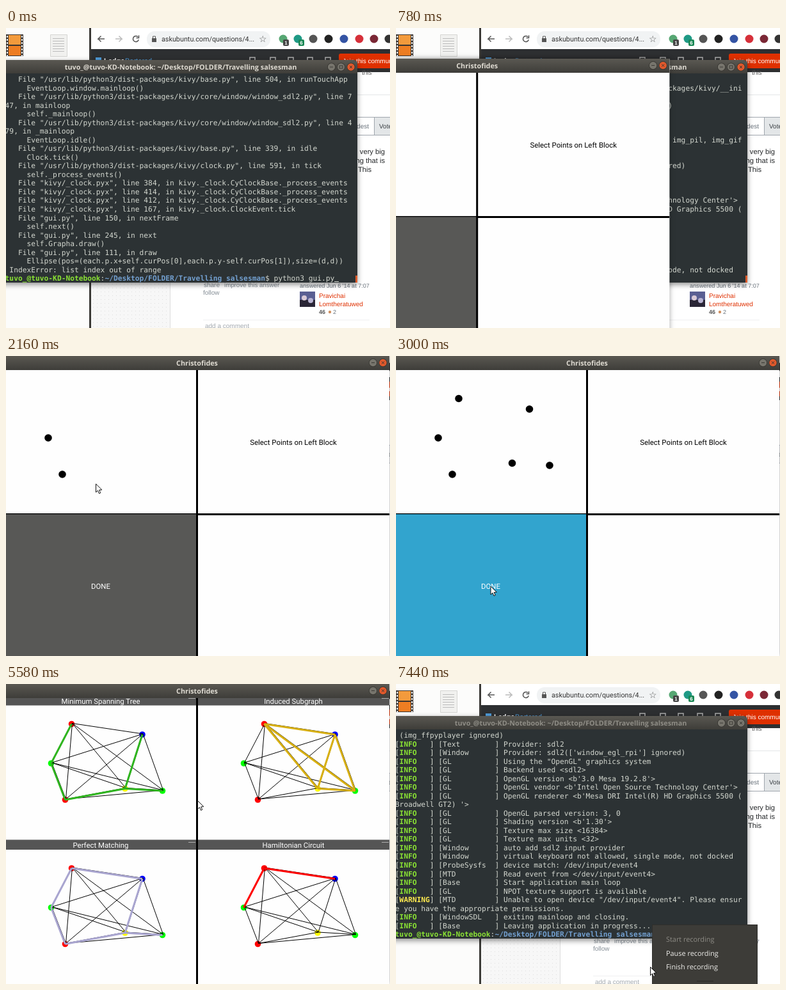
Recreate the animation shown at these times as an HTML page with a canvas. Size 600x469 px, loop 7500 ms.

```html
<!DOCTYPE html>
<html lang="en">
<head>
<meta charset="utf-8">
<title>Christofides</title>
<style>
html, body { margin: 0; width: 100%; height: 100%; overflow: hidden; background: #fff; }
canvas { display: block; width: 600px; height: 469px; }
</style>
</head>
<body>
<canvas id="stage" width="600" height="469"></canvas>
<script>
const ctx = document.getElementById('stage').getContext('2d');
const LOOP = 7500, STEP = 60;
const MONO = '11.25px "DejaVu Sans Mono", monospace';
const UI = '"Open Sans", sans-serif', KIVY = '11.4px Roboto, sans-serif', ARIAL = '"Liberation Sans", sans-serif';
ctx.textRendering = 'geometricPrecision';

// --- drawing helpers
function rect(x, y, w, h, color) {
  ctx.fillStyle = color;
  ctx.fillRect(x, y, w, h);
}
function round(x, y, w, h, r, color) {
  ctx.fillStyle = color;
  ctx.beginPath();
  ctx.roundRect(x, y, w, h, r);
  ctx.fill();
}
function dot(x, y, r, color) {
  ctx.fillStyle = color;
  ctx.beginPath();
  ctx.arc(x, y, r, 0, 7);
  ctx.fill();
}
function line(points, color, width = 1) {
  ctx.strokeStyle = color;
  ctx.lineWidth = width;
  ctx.beginPath();
  points.forEach(p => ctx.lineTo(p[0], p[1]));
  ctx.stroke();
}
function text(s, x, y, font, color, align = 'left') {
  ctx.font = font;
  ctx.fillStyle = color;
  ctx.textAlign = align;
  ctx.fillText(s, x, y);
}
// Linear interpolation through keys [time, x, y]
function track(keys, t) {
  const k = keys.findIndex(key => key[0] > t);
  if (k < 0) return keys.at(-1).slice(1);
  if (k === 0) return keys[0].slice(1);
  const [t0, x0, y0] = keys[k - 1], [t1, x1, y1] = keys[k], u = (t - t0) / (t1 - t0);
  return [x0 + (x1 - x0) * u, y0 + (y1 - y0) * u];
}
const countUntil = (times, t) => times.filter(time => time <= t).length;

// --- terminal contents
const HOST = 'tuvo_@tuvo-KD-Notebook', DIR = '~/Desktop/FOLDER/Travelling salsesman';
const LIB = '/usr/lib/python3/dist-packages/kivy/';
const wrap = s => s.match(/.{1,80}/g);
const call = (file, row, fn, code) =>
  [...wrap(`   File "${file}", line ${row}, in ${fn}`), ...(code ? ['     ' + code] : [])];
const log = (tag, msg, level = 'INFO') => wrap(`[${level.padEnd(7)}] [${tag.padEnd(12)}] ${msg}`);
const prompt = HOST + ':' + DIR + '$ ';

const trace = [
  call(LIB + 'base.py', 504, 'runTouchApp', 'EventLoop.window.mainloop()'),
  call(LIB + 'core/window/window_sdl2.py', 747, 'mainloop', 'self._mainloop()'),
  call(LIB + 'core/window/window_sdl2.py', 479, '_mainloop', 'EventLoop.idle()'),
  call(LIB + 'base.py', 339, 'idle', 'Clock.tick()'),
  call(LIB + 'clock.py', 591, 'tick', 'self._process_events()'),
  ...[384, 414, 412].map(n => call('kivy/_clock.pyx', n, 'kivy._clock.CyClockBase._process_events')),
  call('kivy/_clock.pyx', 167, 'kivy._clock.ClockEvent.tick'),
  call('gui.py', 150, 'nextFrame', 'self.next()'),
  call('gui.py', 245, 'next', 'self.Grapha.draw()'),
  call('gui.py', 111, 'draw', 'Ellipse(pos=(each.p.x+self.curPos[0],each.p.y-self.curPos[1]),size=(d,d))'),
  ' IndexError: list index out of range',
  prompt + 'python3 gui.py'
].flat();
const output = [
  log('Kivy', 'v1.11.1'),
  log('Kivy', `Installed at "${LIB}__init__.py"`),
  log('Python', 'v3.6.9 (default, Jul 17 2020, 12:50:27)'), '[GCC 8.4.0]',
  log('Python', 'Interpreter at "/usr/bin/python3"'),
  log('Factory', '184 symbols loaded'),
  log('Image', 'Providers: img_tex, img_dds, img_sdl2, img_pil, img_gif (img_ffpyplayer ignored)'),
  log('Text', 'Provider: sdl2'),
  log('Window', "Provider: sdl2(['window_egl_rpi'] ignored)"),
  ...['Using the "OpenGL" graphics system', 'Backend used <sdl2>',
    "OpenGL version <b'3.0 Mesa 19.2.8'>", "OpenGL vendor <b'Intel Open Source Technology Center'>",
    "OpenGL renderer <b'Mesa DRI Intel(R) HD Graphics 5500 (Broadwell GT2) '>",
    'OpenGL parsed version: 3, 0', "Shading version <b'1.30'>",
    'Texture max size <16384>', 'Texture max units <32>'].map(s => log('GL', s)),
  log('Window', 'auto add sdl2 input provider'),
  log('Window', 'virtual keyboard not allowed, single mode, not docked'),
  log('ProbeSysfs', 'device match: /dev/input/event4'),
  log('MTD', 'Read event from </dev/input/event4>'),
  log('Base', 'Start application main loop'),
  log('GL', 'NPOT texture support is available'),
  log('MTD', 'Unable to open device "/dev/input/event4". Please ensure you have the appropriate permissions.', 'WARNING'),
  log('WindowSDL', 'exiting mainloop and closing.'),
  log('Base', 'Leaving application in progress...'),
  prompt
].flat();
const LOG_KEYS = [[60, 0], [120, 2], [180, 6], [240, 9], [300, 14], [360, 21], [420, 23],
  [1000, 29], [6780, 30], [6840, 31], [6960, 32]];

function terminalLine(s, y) {
  const cell = 6.773, x = -1.4;
  const put = (part, col, color, bold) => text(part, x + col * cell, y, (bold ? 'bold ' : '') + MONO, color);
  const level = s.match(/^\[(INFO|WARNING)/);
  if (s.startsWith(HOST)) {
    const n = HOST.length, end = n + 1 + DIR.length;
    put(HOST, 0, '#8ae234', true);
    put(':', n, '#d3d7cf');
    put(DIR, n + 1, '#729fcf', true);
    put(s.slice(end), end, '#d3d7cf');
  } else if (level) {
    put('[', 0, '#d3d7cf');
    put(level[1], 1, level[1] === 'INFO' ? '#8ae234' : '#fce94f', true);
    put(s.slice(8), 8, '#d3d7cf');
  } else put(s, 0, '#d3d7cf');
}

function titleBar(x, y, w, h, title, cx, color) {
  const g = ctx.createLinearGradient(0, y, 0, y + h);
  g.addColorStop(0, '#5a5852');
  g.addColorStop(1, '#3e3d39');
  rect(x, y, w, h, g);
  text(title, cx, y + h / 2 + 4, 'bold 10.8px ' + UI, color, 'center');
}
function windowButton(x, y, kind, color) {
  dot(x, y, 6.5, '#33322e');
  dot(x, y, 5.7, color);
  const ink = '#3a3935';
  if (kind === 'min') line([[x - 2.5, y], [x + 2.5, y]], ink);
  else if (kind === 'max') { ctx.strokeStyle = ink; ctx.lineWidth = 1; ctx.strokeRect(x - 2.5, y - 2, 5, 4); }
  else {
    line([[x - 2, y - 2], [x + 2, y + 2]], ink);
    line([[x - 2, y + 2], [x + 2, y - 2]], ink);
  }
}

function terminal(t) {
  const blurred = t >= 6960;
  ctx.save();
  ctx.shadowColor = 'rgba(0,0,0,.45)';
  ctx.shadowBlur = 9;
  ctx.shadowOffsetY = 3;
  round(-9, 50, 558, 348, [6, 6, 0, 0], '#2c3234');
  ctx.restore();
  ctx.save();
  ctx.beginPath();
  ctx.roundRect(-9, 50, 558, 348, [6, 6, 0, 0]);
  ctx.clip();
  titleBar(-9, 50, 558, 21, `${HOST}: ${DIR}`, 273, blurred ? '#8f8d86' : '#dfdbd2');
  windowButton(508.5, 61, 'min', '#77756d');
  windowButton(523.5, 61, 'max', '#77756d');
  windowButton(539, 61, 'close', blurred ? '#77756d' : '#e2592c');

  const shown = LOG_KEYS.filter(k => k[0] <= t).at(-1)?.[1];
  let lines = trace;
  if (shown !== undefined) {
    lines = [...trace, ...output.slice(0, shown)];
    if (shown < output.length) lines.push('');
  }
  lines.slice(-24).forEach((s, i) => terminalLine(s, 84.2 + i * 13.52));
  if (t < STEP) rect(513, 396, 7, 1, '#d3d7cf');
  rect(546, 387, 3, 11, '#dc5a2a');
  ctx.restore();
}

function desktop(t) {
  rect(0, 0, 600, 469, '#fff');
  // file manager
  rect(0, 0, 130, 469, '#fcfcfb');
  rect(0, 10, 27, 34, '#3a3532');
  rect(4, 11, 19, 15, '#f39a3c');
  rect(4, 28, 19, 15, '#ee7d22');
  for (let y = 12; y < 43; y += 5) {
    rect(1, y, 2, 3, '#eee');
    rect(24, y, 2, 3, '#eee');
  }
  round(69, 10, 27, 35, 1, '#d5d5d2');
  rect(70, 11, 25, 33, '#f1f1ef');
  for (let y = 16; y < 40; y += 4) rect(73, y, 18, 1, '#bbb');
  rect(130, 0, 3, 469, '#3b3a37');

  // browser toolbar
  line([[154, 17], [144, 17], [148.5, 12.5], [144, 17], [148.5, 21.5]], '#555', 1.5);
  line([[171, 17], [181, 17], [176.5, 12.5], [181, 17], [176.5, 21.5]], '#bbb', 1.5);
  ctx.strokeStyle = '#555';
  ctx.lineWidth = 1.5;
  ctx.beginPath();
  ctx.arc(203, 17, 4.5, 0.3, 5.5);
  ctx.stroke();
  line([[207.5, 11.5], [207.5, 15.5], [203.5, 15.5]], '#555', 1.5);
  round(220, 5, 193, 25, 12, '#f1f3f4');
  rect(228, 16, 7, 6, '#555');
  line([[229.5, 16], [229.5, 13], [233.5, 13], [233.5, 16]], '#555');
  text('askubuntu.com/questions/4...', 243, 20.5, '10.8px Roboto, sans-serif', '#333');
  text('☆', 395, 22, '14px "DejaVu Sans", sans-serif', '#555');
  [[433, '#57a773'], [456, '#1f9a86'], [480, '#555'], [504, '#222'], [528, '#3454a4'], [552, '#d6303a'],
    [575, '#7b2836'], [598, '#333']].forEach(([x, c]) => dot(x, 17, 6.5, c));
  [[437, '#444', '1'], [461, '#198754', '6']].forEach(([x, c, n]) => {
    round(x - 4, 18, 9, 10, 2, c);
    text(n, x + .5, 26, 'bold 8px ' + ARIAL, '#fff', 'center');
  });

  // page header
  rect(133, 33, 467, 36, '#2d2f31');
  rect(140, 46, 9, 9, '#4f9bd8');
  text('Ledge', 153, 55, 'bold 11px ' + ARIAL, '#fff');
  text('Bartered', 186, 55, '11px ' + ARIAL, '#4f9bd8');
  [385, 417, 445, 475, 503].forEach(x => {
    ctx.strokeStyle = '#aaa';
    ctx.lineWidth = 1.5;
    ctx.strokeRect(x - 4, 46, 8, 8);
  });
  round(520, 40, 90, 23, 3, '#df3000');
  text('Join this community', 526, 55, '10px ' + ARIAL, '#fff');

  // page body
  text('this', 556, 73, '10px ' + ARIAL, '#555');
  rect(549, 104, 51, 1, '#e4e6e8');
  rect(575, 140, 25, 27, '#e3e6e8');
  rect(530, 139, 70, 1, '#9fa6ad');
  rect(530, 167, 70, 1, '#9fa6ad');
  rect(575, 140, 1, 27, '#9fa6ad');
  text('Oldest', 567, 157, '10px ' + ARIAL, '#6a737c', 'right');
  text('Votes', 583, 157, '10px ' + ARIAL, '#3b4045');
  text('very big', 592, 197, '11.2px ' + ARIAL, '#242729', 'right');
  text('thing that is', 592, 211, '11.2px ' + ARIAL, '#242729', 'right');
  text('This', 550, 225, '11.2px ' + ARIAL, '#242729');
  rect(133, 398, 123, 71, '#f7f7f7');
  for (let y = 400; y < 469; y += 6)
    for (let x = 136; x < 254; x += 6) rect(x, y, 1, 1, '#dedede');
  rect(256, 398, 1, 71, '#ddd');
  const gray = '#848d95';
  text('share', 309, 404.5, '10px ' + ARIAL, gray);
  text('improve this answer', 341, 404.5, '9.7px ' + ARIAL, gray);
  text('follow', 308, 417, '10px ' + ARIAL, gray);
  text("answered Jun 6 '14 at 7:07", 459, 406, '9.1px ' + ARIAL, '#6a737c');
  rect(459, 412, 24, 24, '#5a5f93');
  rect(459, 425, 24, 11, '#2a2636');
  dot(466, 422, 4, '#d8c9d6');
  dot(476, 426, 4, '#b9b4d2');
  text('Pravichai', 489, 422, '10px ' + ARIAL, '#df3000');
  text('Lomtheratuwed', 489, 435, '10px ' + ARIAL, '#df3000');
  text('46', 489, 447, 'bold 9px ' + ARIAL, '#555');
  dot(506, 444, 2.2, '#d1905f');
  text('2', 511, 447, '9px ' + ARIAL, '#6a737c');
  rect(308, 456, 260, 1, '#eff0f1');
  text('add a comment', 311, 469, '10px ' + ARIAL, '#a3a9ae');

  if (t >= 360 && t < 540) {
    round(0, -6, 318, 11, 5, '#4a4946');
    rect(0, 60, 390, 409, 'rgba(18,18,18,.93)');
    rect(130, 398, 1, 71, '#3a3a3a');
  }
}

// --- graph application
const NODES = [[70.5, 124, '#0f0'], [92.5, 181, '#f00'], [186, 163.5, '#ff0'],
  [244.5, 167, '#0f0'], [213, 79, '#00f'], [102.5, 62.5, '#f00']];
const EDGES = NODES.flatMap((_, i) => NODES.slice(i + 1).map((_, j) => [i, i + 1 + j]));
const EDGE_TIMES = [...Array.from({ length: 9 }, (_, i) => 3120 + 75 * i), 3960, 4080, 4380, 4500, 4800, 5220];
const CLICKS = [1740, 1920, 2280, 2400, 2580, 2700];
const TREE = [[5, 0], [0, 1], [1, 2], [2, 3], [2, 4]];
const PANES = [
  { name: 'Minimum Spanning Tree', color: '#2fb51f', from: 5280, links: TREE },
  { name: 'Induced Subgraph', color: '#d8b012', from: 5340, links: EDGES.filter(e => e[0] > 1) },
  { name: 'Perfect Matching', color: '#a9a5d0', from: 5400, links: [...TREE, [5, 4]] },
  { name: 'Hamiltonian Circuit', color: '#f00', links: [[0, 5], [5, 4], [4, 2], [2, 3], [3, 1], [1, 0]],
    times: [5520, 5580, 5640, 5640, 5700, 5700] }
];

function pane({ name, color, from, links, times }, i, t) {
  const right = i % 2, low = i > 1;
  const dx = right * 301, dy = low ? 225.5 : 0;
  const at = n => [NODES[n][0] + dx, NODES[n][1] + dy];
  // thin edges sit slightly up and right of the node centres
  const thinAt = n => [NODES[n][0] + dx + 1, NODES[n][1] + dy - 1];
  const x = right ? 300 : 0, w = right ? 299 : 297;
  const top = low ? 243.5 : 22, bottom = 33.5 + dy;
  rect(x, top, w, bottom - top, '#555');
  rect(x + w - 12, low ? 247 : 22, 11, 1, '#b0b0b0');
  text(name, right ? 449 : 148, low ? 256 : 30.5, KIVY, '#fff', 'center');
  NODES.forEach((n, k) => dot(...at(k), 4.8, n[2]));
  EDGES.slice(0, countUntil(EDGE_TIMES, t)).forEach(e => line(e.map(thinAt), '#000'));
  const n = times ? countUntil(times, t) : t >= from ? links.length : 0;
  links.slice(0, n).forEach(e => line(e.map(at), color, 3));
}

function app(t) {
  rect(0, 0, 599, 469, '#fefefe');
  if (t < 3060) {
    rect(0, 246, 298, 223, t >= 2940 ? '#32a4ce' : '#585856');
    rect(0, 246, 298, 1.3, '#000');
    rect(298, 246, 301, 3, '#000');
    rect(297, 22, 3, 447, '#000');
    text('Select Points on Left Block', 449, 138.5, KIVY, '#000', 'center');
    text('DONE', 148, 364, KIVY, '#fff', 'center');
    NODES.slice(0, countUntil(CLICKS, t)).forEach(([x, y]) => dot(x - 4.5, y + 4, 5.8, '#000'));
  } else {
    PANES.forEach((p, i) => pane(p, i, t));
    rect(297, 22, 3, 447, '#000');
  }
  titleBar(0, 0, 599, 22, 'Christofides', 298.5, '#dfdbd2');
  windowButton(573.5, 10.5, 'min', '#77756d');
  windowButton(589, 10.5, 'close', '#e2592c');
}

// --- window drag and pointer
const DRAG = [[720, -210, 60], [1020, -19, 0], [1320, 0, 0]];
const POINTER = [[1260, 92, 6], [1320, 308, 6], [1440, 308, 6], [1740, 66, 128], [1800, 66, 128],
  [1920, 88, 185], [2040, 88, 185], [2160, 140.5, 200], [2280, 181, 168], [2400, 240, 170],
  [2580, 208, 82], [2700, 98, 66], [2880, 148, 340], [3000, 148, 360], [3300, 285, 12],
  [3600, 299.5, 182.5], [5940, 299.5, 182.5], [6300, 588, 9], [6720, 588, 9], [6960, 601, 435],
  [7260, 440, 475], [7320, 425, 462], [7440, 397.5, 442.5]];

function arrow(x, y) {
  ctx.beginPath();
  [[0, 0], [0, 13], [3, 10.3], [5, 15], [7.2, 14], [5.2, 9.5], [9.3, 9.2]].forEach(p => ctx.lineTo(x + p[0], y + p[1]));
  ctx.closePath();
  ctx.fillStyle = '#fff';
  ctx.strokeStyle = '#111';
  ctx.lineWidth = 1;
  ctx.fill();
  ctx.stroke();
}
function hand(x, y) {
  ctx.fillStyle = '#fff';
  ctx.strokeStyle = '#111';
  ctx.lineWidth = 1;
  ctx.beginPath();
  ctx.roundRect(x - 5, y - 4, 10, 8, 3);
  ctx.fill();
  ctx.stroke();
  [-2, 0.5, 3].forEach(dx => line([[x + dx, y - 4], [x + dx, y - 1]], '#111', .8));
}
function pointer(t) {
  if (t >= 780 && t < 1260) {
    const [x, y] = track(DRAG, t);
    hand(x + 92, y + 8);
  } else if (t >= 1260 && (t < 6960 || t >= 7320)) arrow(...track(POINTER, t));
}

function menu() {
  round(400, 376, 165, 100, 2, '#3d3c38');
  ctx.strokeStyle = '#2f2e2b';
  ctx.lineWidth = 1;
  ctx.strokeRect(400.5, 376.5, 164, 100);
  ['Start', 'Pause', 'Finish'].forEach((verb, i) =>
    text(verb + ' recording', 422, 403 + i * 21.6, '10.9px ' + UI, i ? '#f0efec' : '#8d8b85'));
  rect(470, 464, 26, 1, '#2a2926');
}

function draw(t) {
  desktop(t);
  terminal(t);
  if (t >= 540 && t < 6600) {
    ctx.save();
    ctx.globalAlpha = Math.min(1, (6600 - t) / 240);
    ctx.translate(...track(DRAG, t));
    ctx.shadowColor = 'rgba(0,0,0,.4)';
    ctx.shadowBlur = 8;
    rect(0, 0, 599, 469, '#fff');
    ctx.shadowBlur = 0;
    ctx.shadowColor = 'transparent';
    app(t);
    ctx.restore();
  }
  if (t >= 7320) menu();
  pointer(t);
}

function tick() {
  draw(Math.floor((performance.now() % LOOP) / STEP) * STEP);
  requestAnimationFrame(tick);
}
tick();
</script>
</body>
</html>
```
